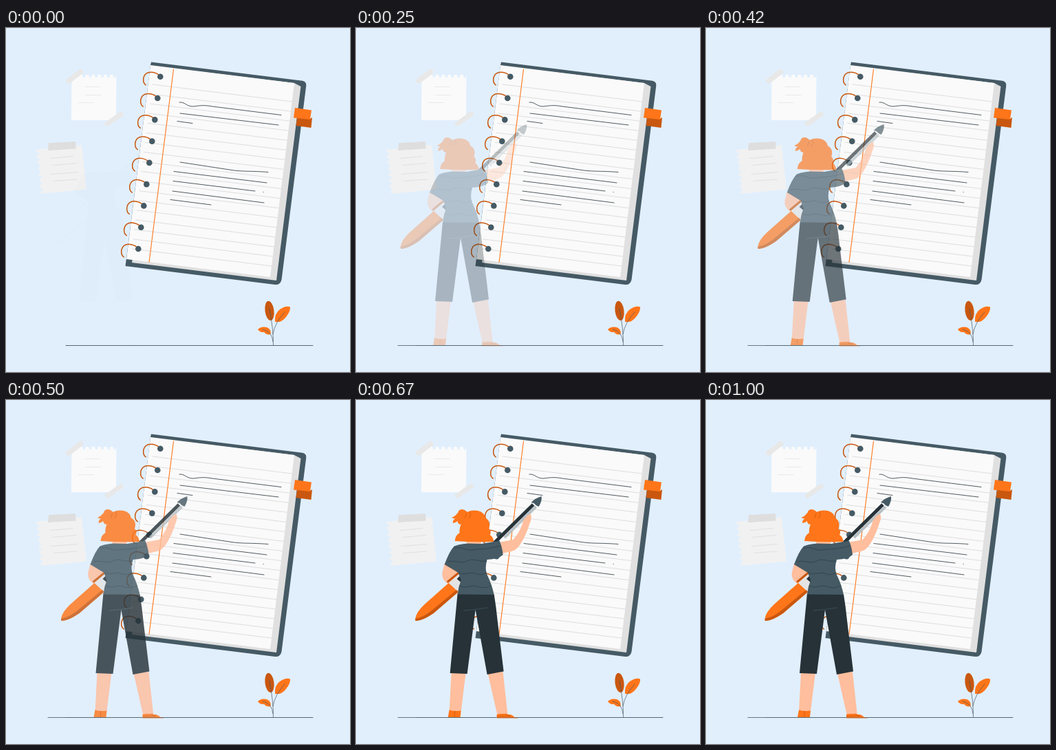
Write an HTML page that moves like this. It is 500 by 500 pixels and loops after 1.04 s.

```html
<!DOCTYPE html>
<html lang="en">
<head>
<meta charset="utf-8">
<title>Writing in a notebook</title>
<style>
  html, body { margin: 0; width: 100%; height: 100%; overflow: hidden; background: #e1effd; }
  svg { display: block; width: 100vw; height: 100vh; }
</style>
</head>
<body>
<svg id="stage" viewBox="0 0 500 500" fill="none" stroke-linecap="round" stroke-linejoin="round">
  <rect width="500" height="500" fill="#e1effd"/>

  <g id="notes">
    <path id="noteA" fill="#fafafa"/>
    <path d="M86 76 108 59Q112 60 113 65L92 81Q88 81 86 76ZM143 138 167 121Q171 122 171 127L148 143Q144 142 143 138Z" fill="#e8e8e8"/>
    <path d="M115 85.5H136M116 97.5H138M105 108.5H127" stroke="#e8e8e8" stroke-width=".9"/>
    <path id="noteB" fill="#f1f1f1"/>
    <path d="M62 167 101 165 101.5 175.5 61 178Z" fill="#dedede"/>
    <path d="M64 189.5 97 186.5M68 199.5 102 196.5M66 212.5 104 209.5M69 222.5 103 220" stroke="#dedede" stroke-width=".9"/>
  </g>

  <g id="notebook">
    <path d="M211 49.5 431 76.8Q437 78 436.3 84L400.5 366Q398.5 374 391 373L173.5 346 175 335 210 54Z" fill="#455a64"/>
    <path d="M211 55 419 80 428.5 85 393 367 183 341 184 335Z" fill="#e0e0e0"/>
    <path d="M210 54 419 80 384 362 175 336Z" fill="#fafafa"/>
    <path id="rules" stroke="#dedede"/>
    <path d="M243.5 60 208 340.5" stroke="#ff7519" stroke-width="1.1"/>
    <path stroke="#263238" stroke-width=".8" d="M252 108C260 107 262 114 272 114C282 113 286 111.5 300 114L400 126.5M253 124 396 141M249 135.5 271 138.5M253 195 328 206.5C345 209 355 207.5 381 209.5M244 208.5 379 225M243 222.5 362 237M374 238.5h.3M242 237 375 254M239 249.500 298 257"/>
    <path d="M423 131 442 132 445 130 443.500 145 421.500 142Z" fill="#c9570f"/>
    <path d="M420 116 444 119.500 442 133 418 130.500Z" fill="#ff7519"/>
    <g id="rings"></g>
  </g>

  <path d="M87 461.500H446" stroke="#455a64" stroke-width=".9"/>
  <path id="floorEnd" d="M61 461.500H87" stroke="#455a64" stroke-width=".8"/>

  <g id="plant">
    <ellipse cx="383" cy="411" rx="6.500" ry="14.300" transform="rotate(-7 383 411)" fill="#c9570f"/>
    <path d="M391 427Q390 415 398 409Q407 403 413 405.500Q414 411 407 420Q400 429 391 427Z" fill="#ff7519"/>
    <path d="M366 438Q371 433 379 435Q386 438 384.500 445Q379 447 375 442Q369 443 366 438Z" fill="#ff7519"/>
    <path d="M388.500 461Q389 440 383 408M388 445Q391 428 405 413M388 456Q387 441 373 438" stroke="#455a64" stroke-width=".7"/>
  </g>

  <g id="woman">
    <path d="M138 396H159L152 453H135ZM191 397 213 395 220 459H205Z" fill="#ffbe9d"/>
    <path d="M135 450.500Q143 453 152 451.500L151 461H133Z" fill="#ff7519"/>
    <path d="M204 457Q212 455 221 457Q227 457 230 461.500H204Z" fill="#ff7519"/>
    <path d="M143 452.500V460M205 459.500 224 459M217 456 223 461.500M205 462H234" stroke="#c9570f" stroke-width=".8"/>

    <path d="M128 238 149 249 135 268Q123 262 125 250Z" fill="#ffbe9d"/>
    <path d="M134 266 152 250 155 272 147 280Z" fill="#e4e4e4"/>
    <path d="M146 260 153 253V266Z" fill="#263238"/>
    <path d="M85.500 318Q87 308 99 297L134 266 148 279 112 310Q96 321 86 321Z" fill="#ff7519"/>
    <path d="M85.500 318Q100 315 113 303L145.500 276 148 279 112 310Q94 322 86 321Z" fill="#c9570f"/>
    <path d="M133 264 150 250" stroke="#c9570f" stroke-width="3"/>

    <path d="M257 152 200 208" stroke="#263238" stroke-width="5" stroke-linecap="butt"/>
    <path d="M261 155 215 200" stroke="#b7c1c6" stroke-width="4" stroke-linecap="butt"/>
    <path d="M269 140Q270 147 265 155L261 153 258 150 254 149Q259 143 269 140Z" fill="#455a64"/>

    <path d="M209 206.500 228 203Q239 190 242 177Q246 167 253 166Q256 170 252 179Q247 196 238 210Q232 219 225 220L212 223Z" fill="#ffbe9d"/>
    <path d="M160 202H181V211H160Z" fill="#ffbe9d"/>
    <path d="M147 281 200 282Q203 300 205 320L214 394.500 190 399 173 305 161 398 136 397Z" fill="#263238"/>
    <path d="M156 306Q172 305 190 302" stroke="#455a64" stroke-width=".7"/>
    <path d="M148 210.500Q155 209 162 208.500L182 209 208 204.500Q212 214 213 225Q207 231 190 232Q186 245 190 254Q197 268 200 283L147 282.500Q148 272 152 262L148 251 128 239Q135 220 142 212.500Z" fill="#455a64"/>
    <path stroke="#2f4049" stroke-width=".8" d="M142 216C153 211 158 220 168 218S187 218 209 212M133 235C143 232 153 239 161 234S178 236 189 234M149 251C159 256 163 249 172 252S182 254 189 251M150 270C160 275 166 268 176 271S187 273 196 270"/>

    <path d="M143 205Q144 196 150 193Q149 187 153 178C153 167 160 160.500 171 160.500C181 160 187 166 187 171C195 175 194 183 192.500 187Q197 191 194 196Q199 199 199.500 206Q170 207 143 205Z" fill="#ff7519"/>
    <path d="M163 165C157 157 149 158 148 163Q145 168 138.500 171Q142 173 144 172Q140 174 140 179Q145 178 147 176Q147 180 151 181Q157 177 159 172Z" fill="#ff7519"/>
    <path d="M165 163Q168 168 163 172M160 165 158 171" stroke="#c9570f" stroke-width=".8"/>
  </g>
</svg>
<script>
const LOOP = 1040, FPS = 24, SLIDE = 30;
const byId = id => document.getElementById(id);

// Scalloped edge from (x, y) along (dx, dy), dipping by (nx, ny).
function torn(count, dx, dy, nx, ny) {
  const tooth = `l${dx * .45} ${dy * .45}q${dx * .28 + nx} ${dy * .28 + ny} ${dx * .55} ${dy * .55}`;
  return tooth.repeat(count);
}

function drawStatic() {
  byId('noteA').setAttribute('d', `M95 134 95.500 68H107${torn(6, 8.9, 0, 0, 9)}L160 134Z`);
  byId('noteB').setAttribute('d', `M110 170 117 234.500 51 241${torn(7, -.9, -8.6, 7, -1)}L44 177Z`);

  let rules = '';
  for (let i = 0; i < 18; i++) {
    const y = 14.06 * i;
    rules += `M${213 - y * .124} ${82 + y}L${415.5 - y * .124} ${107 + y}`;
  }
  byId('rules').setAttribute('d', rules);

  let rings = '';
  for (let i = 0; i < 9; i++) {
    rings += `<g transform="translate(${224.3 - 4 * i} ${70.8 + 31.27 * i})">
      <path d="M0 0C-5-7-16-8-20-5C-26-1-26 9-21 12" stroke="#c9570f" stroke-width="1.5"/>
      <circle r="4.3" fill="#455a64"/></g>`;
  }
  byId('rings').innerHTML = rings;
}

const bezier = (a, b, s) => 3 * (1 - s) ** 2 * s * a + 3 * (1 - s) * s * s * b + s ** 3;

// cubic-bezier(.36, -.01, .5, 1.38): slight overshoot before settling.
function easeBack(x) {
  let lo = 0, hi = 1;
  for (let i = 0; i < 24; i++) {
    const mid = (lo + hi) / 2;
    if (bezier(.36, .5, mid) < x) lo = mid; else hi = mid;
  }
  return bezier(-.01, 1.38, (lo + hi) / 2);
}

function render(ms) {
  const step = Math.floor((ms % LOOP + 4) * FPS / 1000);
  const p = easeBack(Math.min(1, (step + .95) / FPS));
  const woman = byId('woman');
  woman.setAttribute('transform', `translate(${(p - 1) * SLIDE} 0)`);
  woman.setAttribute('opacity', Math.max(0, Math.min(1, p)));
  byId('floorEnd').setAttribute('opacity', step > 0 ? 1 : 0);
}

drawStatic();
render(0);
let start;
requestAnimationFrame(function tick(now) {
  start ??= now;
  render(now - start);
  requestAnimationFrame(tick);
});
</script>
</body>
</html>
```
